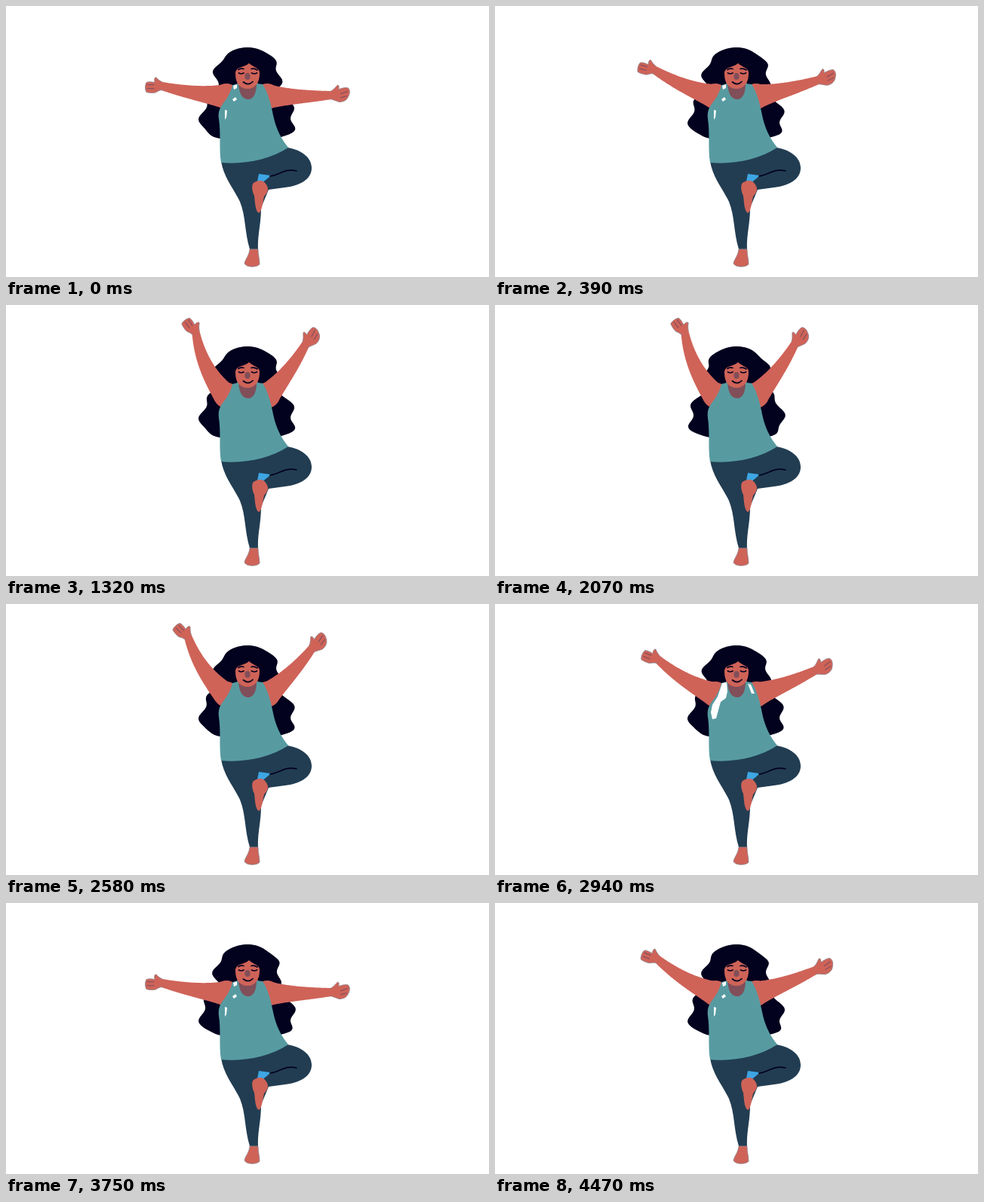
An HTML page that plays this animation: 640 px wide and 360 px high, repeating every 4500 ms.

```html
<!DOCTYPE html>
<html lang="en">
<head>
<meta charset="utf-8">
<title>Tree pose</title>
<style>
html, body { margin: 0; width: 100%; height: 100%; overflow: hidden; background: #fff; }
svg { display: block; width: 100vw; height: 100vh; }
.skin { fill: #cf6358; }
.shade { fill: #804f59; }
.hair { fill: #02011e; }
.top { fill: #579ba1; }
.pants { fill: #223d52; }
.ink { fill: none; stroke: #02011e; stroke-linecap: round; }
.hand { stroke: #8f8189; stroke-width: .8; }
.crease { fill: none; stroke: #87525c; stroke-width: 1.3; stroke-linecap: round; }
</style>
</head>
<body>
<svg viewBox="0 0 640 360">
  <path id="hair" class="hair"/>
  <circle class="skin" cx="292" cy="120" r="17"/>
  <circle class="skin" cx="346" cy="120" r="17"/>
  <path id="armL" class="skin"/>
  <path id="armR" class="skin"/>
  <g id="handL">
    <path class="skin hand" d="M1 -5C-3 -7 -6 -9 -8 -11.5C-10 -12 -11 -10 -10 -5C-14 -6 -19 -6 -21 -5C-23 -2 -23 5 -21 8C-17 9 -12 9 -9 8.5C-6 7 -4 5 1 5"/>
    <path class="crease" d="M-20 -2H-11M-20 3H-11"/>
  </g>
  <g id="handR">
    <path class="skin hand" d="M-1 -5C4 -7 6 -11 9 -13.5C11 -13 11 -11 10 -8C14 -9 19 -11 23 -9.5C26 -6 25 -2 23 2C21 7 16 9 11 9C7 8 4 6 -1 5"/>
    <path class="crease" d="M13 -2L22 -5M13 3L21 1"/>
  </g>
  <path class="shade" d="M306 102H334V122L321 127L309 121Z"/>
  <path class="pants" d="M285 206C315 210 350 202 373 188C391 191 405 201 405 215C405 231 388 239 370 241L348 244L338 268C338 290 333 305 334 323H323C316 300 318 280 310 260C302 243 288 227 285 206Z"/>
  <path class="top" d="M300 105L308 103C309 118 314 124 321 124C328 124 332 116 332 103L340 104C347 114 351 130 354 145C358 165 366 178 374 188C350 204 315 211 285 208C282 190 285 170 282 150C280 136 288 130 293 122C297 115 299 110 300 105Z"/>
  <path id="gaps" fill="#fff"/>
  <path fill="#3ea6e3" d="M335 223L350 225C348 229 343 231 341 234L333 233Z"/>
  <path class="ink" stroke-width="1.7" d="M350 226C363 225 368 215 385 219"/>
  <path class="skin" d="M328 235C334 231 341 231 344 236C350 244 346 248 342 253C340 262 339 273 335 275C330 272 330 260 329 252C326 246 325 238 328 235Z"/>
  <path class="skin hand" d="M323 323H334C334 331 336 336 336 343C332 348 318 347 316 342C317 336 322 332 323 323Z"/>
  <path class="skin" d="M322 76C316 82 304 80 304 90C304 104 311 110 320 110C330 110 336 102 336 90C337 82 328 82 322 76Z"/>
  <ellipse class="shade" cx="320" cy="93.5" rx="3.6" ry="4.5"/>
  <path class="ink" stroke-width="1.7" d="M308 84.5Q311 82.5 315 83.5M325 83.5Q329 82.5 333 85M308.5 89Q311.500 91 315 89M325.500 89Q329 91 332.500 89M314.500 101Q321 106.5 327 100.500"/>
</svg>
<script>
const LOOP = 4500, CYCLE = 3980, MOVE = 1140, FALL = 2300, SWAY = 1340;
const STEPS = 60;
const $ = id => document.getElementById(id);
const ease = v => (1 - Math.cos(Math.PI * Math.min(1, Math.max(0, v)))) / 2;
const outline = pts => "M" + pts.map(p => p.map(v => v.toFixed(2)).join(" ")).join("L") + "Z";

// Angles in degrees above the horizontal; swing, lift, bend and turn grow with the raise.
const ARMS = [
  { id: "L", x: 292, dir: -1, angle: 9, swing: 55, reach: 86, lift: 6, sag: 2, bend: 5, turn: 54 },
  { id: "R", x: 346, dir: 1, angle: 1, swing: 52, reach: 84.5, lift: 0, sag: 1, bend: 2, turn: 44 }
];
const SHOULDER_Y = 120;

const armWidth = u => 11 + 15 * u + 8 * u ** 4;

// A tapered limb along a shallow arc from shoulder to wrist.
function drawArm(arm, raise) {
  const a = (arm.angle + arm.swing * raise) * Math.PI / 180;
  const reach = arm.reach + arm.lift * raise, sag = arm.sag + arm.bend * raise;
  const place = (along, down) => [
    arm.x + arm.dir * (along * Math.cos(a) + down * Math.sin(a)),
    SHOULDER_Y - along * Math.sin(a) + down * Math.cos(a)
  ];
  const above = [], below = [];
  for (let i = 0; i <= STEPS; i++) {
    const u = i / STEPS, mid = 4 * sag * u * (1 - u), half = armWidth(1 - u) / 2;
    above.push(place(reach * u, mid - half));
    below.unshift(place(reach * u, mid + half));
  }
  $("arm" + arm.id).setAttribute("d", outline([...above, ...below]));
  const [x, y] = place(reach, 0);
  $("hand" + arm.id).setAttribute("transform", `translate(${x} ${y}) rotate(${-arm.dir * arm.turn * raise})`);
}

const HAIR = { x: 320, top: 55, bottom: 179, wave: 32, amp: 4 };

// Half the hair's width: a round crown that widens into a full, squarish lower part.
function hairWidth(y) {
  const crown = 43 * Math.sqrt(Math.max(0, 1 - ((y - 95) / 40) ** 2));
  const v = y < 150 ? ((y - 150) / 50) ** 2 : ((y - 150) / 29) ** 4;
  return Math.max(crown, 61 * Math.sqrt(Math.max(0, 1 - v)));
}

// Ripples slide down and back up each side, half a wave apart.
function drawHair(t) {
  const sway = ease(2 * Math.abs((t / SWAY + .44) % 1 - .5) * -1 + 1);
  const slide = 13 * (1 - sway);
  const edge = (dir, crest) => Array.from({ length: STEPS + 1 }, (_, i) => {
    const y = HAIR.top + (HAIR.bottom - HAIR.top) * ease(i / STEPS);
    const fade = Math.min(1, (y - HAIR.top) / 25, (HAIR.bottom - y) / 8);
    const ripple = HAIR.amp * fade * Math.cos(2 * Math.PI * (y - crest - slide) / HAIR.wave);
    return [HAIR.x + dir * (hairWidth(y) + ripple), y];
  });
  $("hair").setAttribute("d", outline([...edge(-1, 150).reverse(), ...edge(1, 165)]));
}

// White breaks in the shirt.
const SLIT = "M290 138L293 139L292 148L290 151Z";
const DOTS = "M301 106L306 104V109L302 111ZM300 124L304 121L306 124L302 127Z";
const STRAPS = "M301 105L307 104L308 116L306 125L299 130L293 152L288 153L286 144L288 134L295 123Z" +
  "M335 106L339 107L344 119H340Z";

function drawGaps(raise, falling) {
  let d = "";
  if (raise < .85) d += SLIT;
  if (raise < .6) d += DOTS;
  if (falling && raise > .06 && raise < .75) d = STRAPS;
  $("gaps").setAttribute("d", d);
}

function draw(t) {
  const s = t % CYCLE;
  const raise = ease(s / MOVE) - ease((s - FALL) / MOVE);
  drawHair(t);
  ARMS.forEach(arm => drawArm(arm, raise));
  drawGaps(raise, s > FALL);
}

const start = performance.now();
function tick() {
  const t = (performance.now() - start) % LOOP;
  draw(Math.floor(t / 30) * 30);
  requestAnimationFrame(tick);
}
tick();
</script>
</body>
</html>
```
